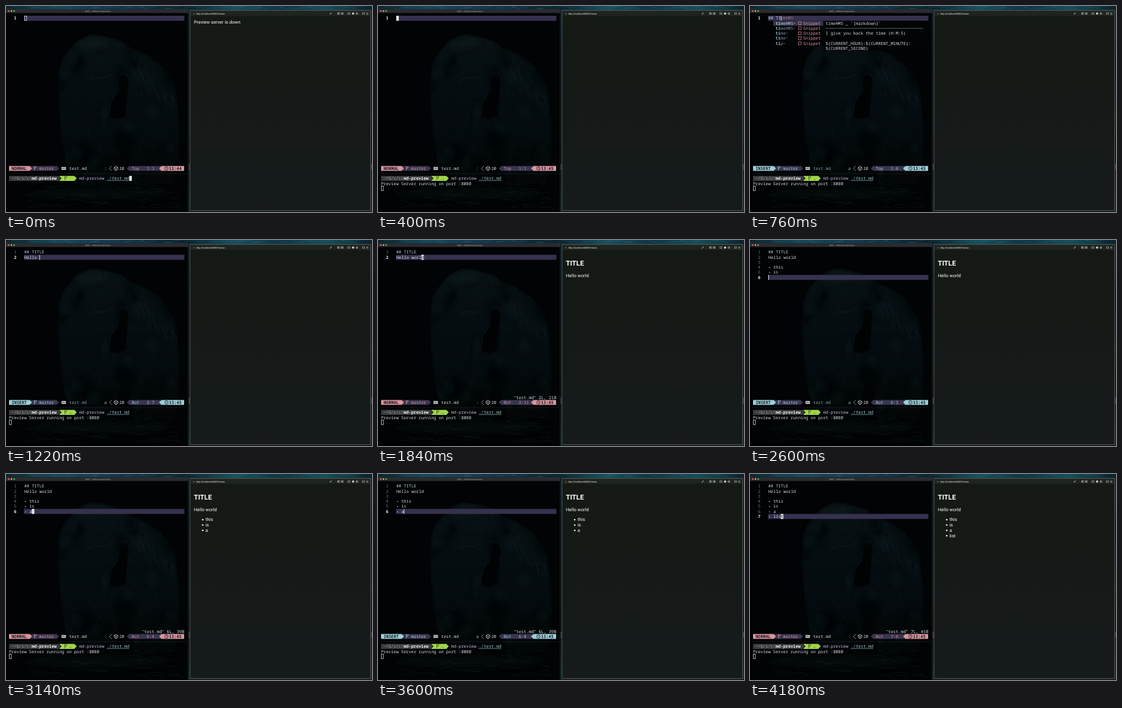
Animation of 600x338 px, one loop 4200 ms. Source, as an HTML page with a canvas:

```html
<!DOCTYPE html>
<html lang="en">
<head>
<meta charset="utf-8">
<title>Markdown preview</title>
<style>
html, body { margin: 0; width: 100%; height: 100%; overflow: hidden; background: #030607; }
canvas { display: block; width: 600px; height: 338px; }
</style>
</head>
<body>
<canvas id="stage" width="600" height="338"></canvas>
<script>
const LOOP = 4200, CELL = 4.11, ROW = 8.25, LEFT = 30;
const MONO = '"Noto Sans Mono", "DejaVu Sans Mono", monospace';
const SANS = 'Roboto, Inter, sans-serif';
const PINK = '#d8959c', FOAM = '#9ccfd8', PURPLE = '#393550', PALE = '#d8dbe6', LIME = '#9fd548';
const stage = document.getElementById('stage');
let c = stage.getContext('2d');

function rect(x, y, w, h, color) {
  c.fillStyle = color;
  c.fillRect(x, y, w, h);
}

function poly(points, color) {
  c.fillStyle = color;
  c.beginPath();
  points.forEach(([x, y]) => c.lineTo(x, y));
  c.fill();
}

function stroke(points, color, width = 0.7, close = false) {
  c.strokeStyle = color;
  c.lineWidth = width;
  c.beginPath();
  points.forEach(([x, y]) => c.lineTo(x, y));
  if (close) c.closePath();
  c.stroke();
}

function dot(x, y, r, color) {
  c.fillStyle = color;
  c.beginPath();
  c.arc(x, y, r, 0, 7);
  c.fill();
}

function text(s, x, y, color, font) {
  c.font = font;
  c.textRendering = 'geometricPrecision';
  c.fillStyle = color;
  c.fillText(s, x, y);
}

const mono = (s, x, y, color = PALE, weight = 400) => text(s, x, y, color, `${weight} 6.85px ${MONO}`);
const sans = (s, x, y, size = 7.5, weight = 400) => text(s, x, y, '#ffffff', `${weight} ${size}px ${SANS}`);
const rowTop = n => 16 + ROW * (n - 1);
const baseline = n => 22.4 + ROW * (n - 1);

function gradient(x0, y0, x1, y1, colors) {
  const g = c.createLinearGradient(x0, y0, x1, y1);
  colors.forEach((color, i) => g.addColorStop(i / (colors.length - 1), color));
  return g;
}

function randomizer(seed) {
  return () => (seed = (seed * 16807) % 2147483647) / 2147483647;
}

function blob(x, y, rx, ry, color, blur = 4, turn = 0) {
  c.filter = `blur(${blur}px)`;
  c.fillStyle = color;
  c.beginPath();
  c.ellipse(x, y, rx, ry, turn, 0, 7);
  c.fill();
  c.filter = 'none';
}

// Dim wallpaper behind the terminal
function drawBear() {
  const body = new Path2D('M105 71 Q112 58 126 53 Q138 44 150 48 L169 51 L190 58 L206 70 L222 76 '
    + 'Q248 88 262 106 Q280 130 281 165 Q290 220 278 290 L210 300 Q206 250 190 230 '
    + 'Q184 270 172 296 L106 294 Q94 250 89 200 Q84 150 87 105 Q92 82 105 71Z');
  c.filter = 'blur(1.5px)';
  c.fillStyle = gradient(0, 45, 0, 300, ['#071012', '#050d10', '#040a0d', '#020506']);
  c.fill(body);
  c.filter = 'none';

  c.save();
  c.clip(body);
  const rnd = randomizer(71);
  for (let i = 0; i < 34; i++) {
    blob(88 + rnd() * 185, 55 + rnd() * 220, 4 + rnd() * 9, 6 + rnd() * 14,
      i % 2 ? 'rgba(20,40,44,.16)' : 'rgba(0,2,3,.4)', 3, rnd() - 0.5);
  }
  for (let i = 0; i < 420; i++) {
    const x = 85 + rnd() * 195, y = 48 + rnd() * 235, bend = (x - 165) / 22;
    stroke([[x, y], [x + bend, y + 4], [x + bend * 1.5, y + 6 + rnd() * 6]],
      i % 2 ? 'rgba(38,66,72,.13)' : 'rgba(0,2,3,.3)');
  }
  // Light catching the shoulder fur
  for (let i = 0; i < 55; i++) {
    const x = 205 + i * 1.25 + rnd() * 5, y = 72 + i * 1.4 + rnd() * 26;
    stroke([[x, y], [x + 3, y + 5], [x + 4, y + 10]], 'rgba(50,78,80,.2)');
  }
  c.restore();

  blob(142, 62, 26, 8, 'rgba(28,48,50,.25)', 5, -0.1);
  blob(122, 90, 6, 8, 'rgba(0,3,4,.7)', 2.5);
  blob(212, 95, 5, 8, 'rgba(0,3,4,.7)', 2.5);
  c.filter = 'blur(1px)';
  poly([[188, 114], [201, 118], [198, 150], [196, 180], [182, 186], [169, 181], [172, 158], [185, 138]], '#010203');
  c.filter = 'none';
  const light = 'rgba(50,85,92,.3)';
  stroke([[132, 124], [146, 117], [160, 119], [174, 112]], light);
  stroke([[188, 112], [194, 110], [201, 116], [203, 126]], light);
  stroke([[184, 140], [172, 156], [168, 180]], light);
}

function drawGround() {
  blob(150, 308, 120, 8, '#050b0d', 5);
  const rnd = randomizer(19);
  for (let i = 0; i < 60; i++) {
    const x = 30 + rnd() * 250, y = 290 + rnd() * 42, w = 5 + rnd() * 20;
    stroke([[x, y], [x + w / 2, y - rnd() * 3], [x + w, y + rnd() * 3]], 'rgba(46,78,82,.17)', 1);
  }
}

function drawFrame() {
  rect(0, 0, 600, 338, '#071116');
  rect(0, 0, 600, 8, gradient(0, 0, 600, 0,
    ['#0a222b', '#11485a', '#123d55', '#0b2d3e', '#0a2530', '#15505f', '#0c3543', '#14505a', '#0a222c']));
  const rnd = randomizer(5);
  for (let i = 0; i < 60; i++) {
    const x = rnd() * 600;
    stroke([[x, rnd() * 5], [x + 12, rnd() * 5]], 'rgba(48,122,142,.22)', 1);
  }
  for (const x of [299, 598]) {
    rect(x, 8, 2.5, 330, gradient(0, 8, 0, 338, ['#0a2029', '#071115', '#0a1519', '#080f12', '#0a242c']));
    rect(x + 0.7, 259, 1, 10, '#68504f');
  }

  rect(0, 5, 299, 333, '#010304');
  c.save();
  c.beginPath();
  c.rect(0, 11, 299, 327);
  c.clip();
  drawBear();
  drawGround();
  c.restore();
  rect(0, 5, 299, 6.5, '#292b2f');
  ['#f2655c', '#e9b744', '#56bd4e'].forEach((color, i) => dot(4.6 + i * 4.4, 8.3, 1.3, color));
  c.textAlign = 'center';
  text('2000 ~/Github/md-preview', 150.5, 9.6, '#a7a9ac', `3.5px ${SANS}`);
  c.textAlign = 'left';
  stroke([[4, 275], [297, 275]], '#20272a', 0.6);
  stroke([[298.6, 11], [298.6, 338]], '#22292c', 0.8);

  rect(301, 6.5, 297.5, 330, '#464b4a');
  rect(302.5, 8, 294.5, 327, '#141a17');
  rect(302.5, 8, 294.5, 8.5, '#20241f');
  rect(302.5, 16.5, 294.5, 318.5, gradient(0, 16, 0, 334, ['#141914', '#151a18', '#161a1b']));
  drawToolbar();
}

function drawToolbar() {
  const gray = '#a2a8a5';
  dot(308, 12.7, 0.8, gray);
  text('http://localhost:8080/Preview', 312, 13.9, '#d6dad7', `500 3.5px ${SANS}`);
  stroke([[530.8, 13.8], [533.8, 10.9]], gray, 1.1);
  for (const x of [545, 551, 562, 586]) {
    c.strokeStyle = gray;
    c.lineWidth = 0.7;
    c.strokeRect(x - 1.6, 11, 3.4, 2.7);
  }
  rect(544.3, 11, 1, 2.7, gray);
  rect(551, 11, 1, 2.7, gray);
  dot(569, 12.4, 1.8, '#cbd0cd');
  dot(575.3, 12.4, 1.8, gray);
  dot(575.3, 12.4, 0.8, '#1c211f');
  for (let y = 11; y < 15; y += 1.4) rect(590.5, y, 3.4, 0.6, gray);
}

const wallpaper = document.createElement('canvas');
wallpaper.width = 600;
wallpaper.height = 338;
c = wallpaper.getContext('2d');
drawFrame();
c = stage.getContext('2d');

const typed = (s, start, step, t) => s.slice(0, Math.max(0, Math.floor((t - start) / step)));
const between = (t, a, b) => t >= a && t < b;

function editorAt(t) {
  let body = typed('## TITLE\nHello world', 520, 46, t) + typed('\n\n- this\n- is\n- a ', 2025, 40, t);
  const tail = typed('\n- list', 3600, 36, t);
  if (tail) body = body.trimEnd() + tail;
  const lines = body.split('\n');
  const insert = between(t, 500, 1520) || between(t, 2065, 2840) || between(t, 3480, 3960);
  const length = lines[lines.length - 1].length;
  const onSpace = between(t, 3480, 3636);
  return {
    lines, insert,
    row: lines.length,
    col: insert && !onSpace ? length + 1 : Math.max(1, length),
    dirty: between(t, 540, 1700) || between(t, 2065, 3060) || between(t, 3636, 4080),
    message: between(t, 1700, 2065) ? '2L, 21B' : between(t, 3060, 3636) ? '6L, 39B' : t >= 4080 ? '7L, 45B' : ''
  };
}

function hollow(x, y) {
  c.strokeStyle = PALE;
  c.lineWidth = 0.8;
  c.strokeRect(x + 0.4, y + 0.4, 3.5, 7.3);
}

function drawEditor(ed, focused) {
  const y = rowTop(ed.row), x = LEFT + (ed.col - 1) * CELL;
  rect(LEFT - 0.5, y, 263, ROW, '#35314f');
  ed.lines.forEach((line, i) => {
    const current = i + 1 === ed.row;
    mono(i + 1, 13, baseline(i + 1), current ? '#eceef5' : '#657c87', current ? 700 : 400);
    mono(line, LEFT, baseline(i + 1), i ? PALE : '#b8d2dc');
    if (line[0] === '-') mono('-', LEFT, baseline(i + 1), FOAM);
  });
  if (!focused) hollow(x, y);
  else if (ed.insert) rect(x, y + 0.3, 0.9, 7.8, '#f1f2f6');
  else {
    rect(x, y, CELL, ROW, '#e7e8ee');
    mono(ed.lines[ed.row - 1][ed.col - 1] || '', x, baseline(ed.row), '#191724');
  }
  if (ed.message) mono(`"test.md" ${ed.message}`, 222.5, 260.6);
}

function drawPopup() {
  mono('meHMS', LEFT + 5 * CELL, baseline(1), '#8e7588');
  rect(38, rowTop(2), 82, ROW * 5, '#030406');
  rect(38, rowTop(2), 82, ROW, '#35334a');
  ['timeHMS~', 'timeHMS~', 'time~', 'time~', 'tip~'].forEach((name, i) => {
    const y = baseline(i + 2);
    mono(name, 42, y, i ? '#8290a5' : '#c6cbda');
    mono('ti', 42, y, FOAM);
    c.strokeStyle = PINK;
    c.lineWidth = 0.7;
    c.strokeRect(79.5, y - 4.8, 4.5, 4.5);
    mono('Snippet', 87, y, PINK);
  });
  rect(120, rowTop(2), 168, ROW * 6, '#030406');
  mono('timeHMS _ `[markdown]`', 124, baseline(2));
  stroke([[124, 36.7], [284, 36.7]], '#9599a6', 0.6);
  mono('I give you back the time (H:M:S)', 124, baseline(4));
  mono('${CURRENT_HOUR}:${CURRENT_MINUTE}:', 124, baseline(6));
  mono('${CURRENT_SECOND}', 124, baseline(7));
}

function branch(x, y, color) {
  stroke([[x, y - 3], [x, y + 3]], color, 0.8);
  stroke([[x, y + 1], [x + 2.5, y - 0.8], [x + 2.5, y - 2.5]], color, 0.8);
  dot(x, y - 2.7, 0.8, color);
  dot(x + 2.5, y - 2.5, 0.8, color);
}

function drawStatus(ed, t) {
  const main = ed.insert ? FOAM : PINK, ink = '#191724', top = 262.4, mid = 266.5, end = 270.6, base = 268.9;
  poly([[38, top], [83, top], [87, mid], [83, end], [38, end]], PURPLE);
  poly([[5, top], [38.5, top], [42.5, mid], [38.5, end], [5, end]], main);
  mono(ed.insert ? 'INSERT' : 'NORMAL', 9.2, base, ink, 700);
  branch(46.5, mid, main);
  mono('master', 54.2, base, main);
  rect(91, 264.2, 7.2, 4.7, '#e0e2e8');
  stroke([[92.3, 268], [92.3, 265.4], [93.5, 266.8], [94.7, 265.4], [94.7, 268]], ink, 0.7);
  stroke([[96.5, 265.2], [96.5, 267.9]], ink, 0.7);
  mono('test.md', 103.6, base, ed.dirty ? '#7fa9b1' : PALE);
  mono(ed.insert ? 'a' : ':', 161, base, ed.insert ? FOAM : PALE);
  stroke([[173.5, 262.5], [169.3, mid], [173.5, 270.5]], '#bbbdd0', 0.7);
  stroke([[180.3, 263.1], [183.3, 264.8], [183.3, 268.2], [180.3, 269.9], [177.3, 268.2], [177.3, 264.8]], PALE, 0.8, true);
  stroke([[177.3, 264.8], [180.3, 266.5], [183.3, 264.8]], PALE);
  stroke([[180.3, 266.5], [180.3, 269.9]], PALE);
  mono('20', 185.7, base);
  poly([[202, top], [255, top], [255, end], [202, end], [198, mid]], PURPLE);
  mono(ed.row > 1 ? 'Bot' : 'Top', 206, base, main);
  mono(`${ed.row}:${ed.col}`, 230.7, base, main);
  poly([[255, top], [292, top], [292, end], [255, end], [251, mid]], main);
  c.strokeStyle = ink;
  c.lineWidth = 0.8;
  c.beginPath();
  c.arc(263, mid, 2.9, 0, 7);
  c.stroke();
  stroke([[263, 264.7], [263, 266.7], [264.4, 267.3]], ink);
  mono(t < 400 ? '13:44' : '13:45', 267.2, base, ink, 700);
}

function drawTerminal(running, focused) {
  const top = 278.7, mid = 282.8, end = 286.9, base = 285.1;
  poly([[87, top], [112, top], [116, mid], [112, end], [87, end], [91, mid]], LIME);
  poly([[5, top], [86, top], [90, mid], [86, end], [5, end]], '#393b3d');
  mono('~/G/s/c/', 9, base, '#a5a8aa');
  mono('md-preview', 9 + 8 * CELL, base, '#f0f1f2', 700);
  branch(96.5, mid, '#3d4b29');
  if (running) mono('…', 104, base, '#3d4b29');
  mono('md-preview', 120, base, '#c9bddd');
  mono('./test.md', 165.2, base, FOAM);
  stroke([[165.2, 286.4], [202.2, 286.4]], FOAM, 0.6);
  if (running) mono('Preview Server running on port :8080', 5, 293.5);
  if (!running) rect(202.2, top, CELL, ROW, '#e7e8ee');
  else if (focused) rect(5, 295.2, CELL, ROW, '#e7e8ee');
  else hollow(5, 295.2);
}

function drawPreview(t) {
  if (t < 260) sans('Preview server is down', 308, 29.2);
  if (t < 1740) return;
  sans('TITLE', 308, 42, 11.25, 700);
  sans('Hello world', 308, 61);
  const count = t < 3100 ? 0 : t < 4120 ? 3 : 4;
  ['this', 'is', 'a', 'list'].slice(0, count).forEach((item, i) => {
    const y = 77.4 + i * 8.8;
    dot(322.5, y - 2.5, 1.25, '#ffffff');
    sans(item, 327, y);
  });
}

function draw(now) {
  const t = now % LOOP, ed = editorAt(t), inEditor = t >= 300;
  c.drawImage(wallpaper, 0, 0);
  drawEditor(ed, inEditor);
  if (ed.lines[0] === '## TI') drawPopup();
  drawStatus(ed, t);
  drawTerminal(t >= 140, !inEditor);
  drawPreview(t);
}

const start = performance.now();
function tick() {
  draw(performance.now() - start);
  requestAnimationFrame(tick);
}
tick();
</script>
</body>
</html>
```
